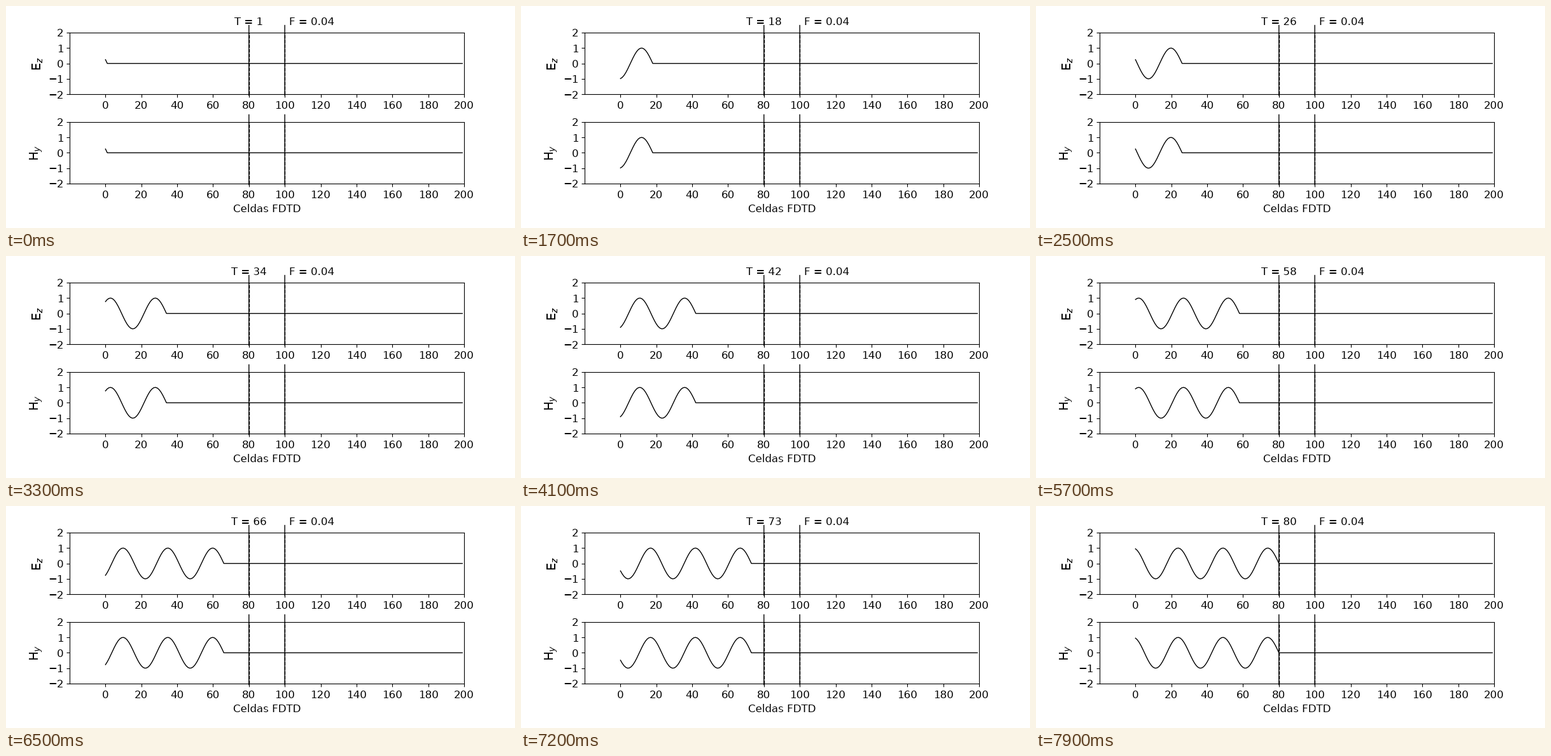
Recreate the animation shown at these times as a matplotlib script. Size 800 by 350 pixels, loop 8000 ms.

```python
import numpy as np
import matplotlib.pyplot as plt
from matplotlib.animation import FuncAnimation

FREQ = 0.04
STEPS = 80
SLAB = (80, 100)
cells = np.arange(200)

plt.rcParams["font.family"] = "DejaVu Sans"
plt.rcParams["font.size"] = 12
plt.rcParams["text.hinting"] = "native"


def field(step):
    """Sine wave entering at cell 0, one cell per time step."""
    delay = step - cells
    return np.where(delay > 0, np.sin(2 * np.pi * FREQ * delay), 0)


def setup(ax, label):
    ax.set_xlim(-20, 200)
    ax.set_ylim(-2, 2)
    ax.set_xticks(np.arange(0, 201, 20))
    ax.set_yticks(np.arange(-2, 3))
    ax.set_ylabel(label, fontsize=14)
    for x in SLAB:
        ax.plot([x, x], [-2.1, 2.5], "k-", linewidth=1, clip_on=False,
                snap=False, solid_capstyle="butt")
        ax.axvline(x, color="k", linestyle="--", linewidth=1)
    return ax.plot(cells, field(1), color="k", linewidth=1)[0]


fig, (ax_e, ax_h) = plt.subplots(2, 1, figsize=(8, 3.5), dpi=100)
fig.subplots_adjust(left=0.125, right=0.9, bottom=0.2, top=0.88, hspace=0.45)

waves = [setup(ax_e, "E$_z$"), setup(ax_h, "H$_y$")]
ax_h.set_xlabel("Celdas FDTD")
clock = ax_e.text(80, 2.5, "T = 1", ha="center")
ax_e.text(115, 2.5, f"F = {FREQ}", ha="center")


def update(i):
    step = i + 1
    for wave in waves:
        wave.set_ydata(field(step))
    clock.set_text(f"T = {step}")
    return [*waves, clock]


anim = FuncAnimation(fig, update, frames=STEPS, interval=100,
                     repeat=True, repeat_delay=0)
plt.show()
```
